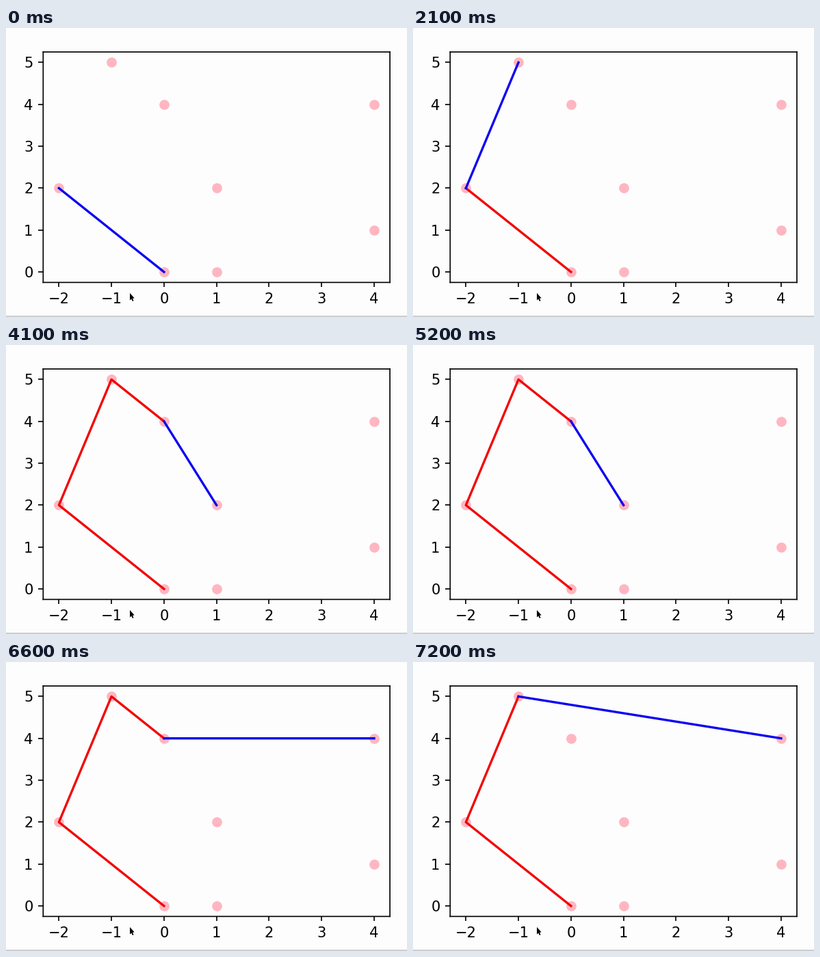
Recreate the animation shown at these times as a matplotlib script. Size 586 by 423 pixels, loop 8 s.

```python
from math import atan2

import matplotlib.pyplot as plt
from matplotlib.animation import FuncAnimation
from matplotlib.patches import Polygon, Rectangle

W, H, DPI = 586, 423, 128
INTERVAL, FRAMES = 100, 80
BG, PINK, RED, BLUE = "#fdfdfe", "#ffb6c1", "#f20405", "#0c04f0"
LEFT, RIGHT, TOP, BOTTOM = 54.3, 561, 35.1, 372.4
UNIT = 2.1          # pixels per point of the chart's own scale
BEAT, LEAD = 690, 130  # ms per pop (a push takes two), ms already elapsed

POINTS = [(0, 0), (1, 0), (-2, 2), (1, 2), (4, 1), (0, 4), (4, 4), (-1, 5)]


def pt(px):
    return px * 72 / DPI


def turns_left(a, b, c):
    return (b[0] - a[0]) * (c[1] - b[1]) > (b[1] - a[1]) * (c[0] - b[0])


def graham_scan(points):
    """Yield (start time, stack) for each push and pop, clockwise by angle."""
    order = sorted(points[1:], key=lambda p: -atan2(p[1], p[0]))
    hull, t = [points[0]], -LEAD
    for p in order:
        hull.append(p)
        yield t, hull[:]
        while len(hull) > 2 and turns_left(*hull[-3:]):
            del hull[-2]
            t += BEAT
            yield t, hull[:]
        t += 2 * BEAT


STEPS = list(graham_scan(POINTS))

fig = plt.figure(figsize=(W / DPI, H / DPI), dpi=DPI, facecolor=BG)


def pixel_layer(zorder):
    """Full-stage axes in pixel coordinates, y downwards."""
    layer = fig.add_axes([0, 0, 1, 1], zorder=zorder)
    layer.set(xlim=(0, W), ylim=(H, 0))
    layer.axis("off")
    return layer


pixel_layer(0).add_patch(Rectangle((0, 420.6), W, 1.9, fc="#cdcdcd", lw=0))

ax = fig.add_axes([LEFT / W, 1 - BOTTOM / H, (RIGHT - LEFT) / W, (BOTTOM - TOP) / H],
                  facecolor=BG, zorder=1)
ax.set(xlim=(-2.3, 4.3), ylim=(-0.25, 5.25), xticks=range(-2, 5), yticks=range(6))
ax.tick_params(length=pt(3.5 * UNIT), width=pt(0.8 * UNIT), pad=pt(3.5 * UNIT),
               labelsize=pt(10 * UNIT), labelfontfamily="DejaVu Sans")
for spine in ax.spines.values():
    spine.set(linewidth=pt(0.8 * UNIT), snap=False)

ax.scatter(*zip(*POINTS), s=pt(7 * UNIT) ** 2, c=PINK, linewidths=0, zorder=1)
stroke = dict(lw=pt(1.6 * UNIT), solid_capstyle="projecting",
              solid_joinstyle="round", snap=False)
hull_line, = ax.plot([], [], color=RED, zorder=2, **stroke)
probe, = ax.plot([], [], color=BLUE, zorder=3, **stroke)

# Mouse pointer
arrow = [(181, 388), (181, 398.6), (183.2, 396.6), (184.9, 400),
         (186.5, 399.2), (185, 395.9), (187.6, 395.4)]
pixel_layer(5).add_patch(Polygon(arrow, fc="black", lw=0))


def update(i):
    t = i * INTERVAL
    path = [hull for start, hull in STEPS if start <= t][-1]
    hull_line.set_data(*zip(*path[:-1]))
    hull_line.set_visible(len(path) > 2)
    probe.set_data(*zip(*path[-2:]))
    return hull_line, probe


anim = FuncAnimation(fig, update, frames=FRAMES, interval=INTERVAL,
                     repeat=True, repeat_delay=0)
plt.show()
```
